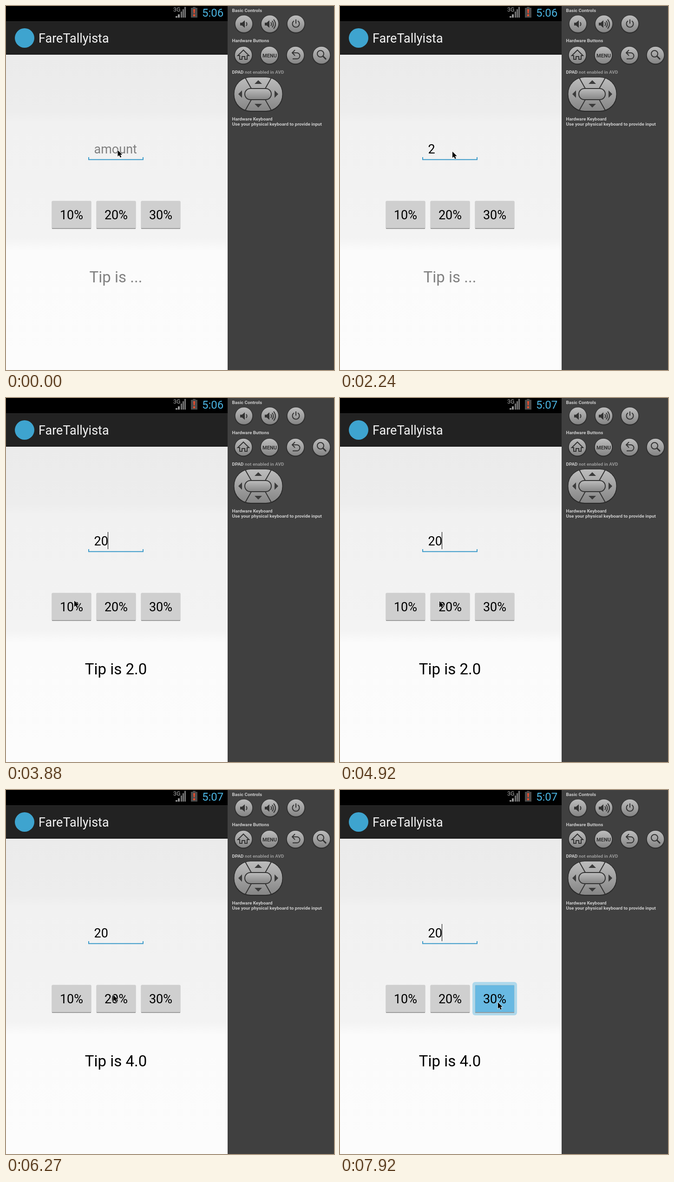
These frames come from a looping animation (706 by 785 pixels, 8 s). An HTML page:

```html
<!DOCTYPE html>
<html lang="en">
<head>
<meta charset="utf-8">
<title>Tip app</title>
<style>
html, body { margin: 0; width: 100%; height: 100%; overflow: hidden; background: #404040; }
svg { display: block; width: 706px; height: 785px; font-family: Roboto, sans-serif; }
.app { font-size: 27px; }
.mid { text-anchor: middle; }
.side { font-size: 9.9px; font-weight: 700; fill: #ccc; }
.ink { fill: none; stroke: #333; stroke-width: 2; }
</style>
</head>
<body>
<svg viewBox="0 0 706 785">
  <defs>
    <linearGradient id="page" gradientUnits="userSpaceOnUse" x1="0" y1="105" x2="0" y2="785">
      <stop offset="0" stop-color="#ebebeb"/>
      <stop offset=".18" stop-color="#ededed"/>
      <stop offset=".215" stop-color="#f1f1f1"/>
      <stop offset=".58" stop-color="#f3f3f3"/>
      <stop offset=".622" stop-color="#fbfbfb"/>
      <stop offset="1" stop-color="#fcfcfc"/>
    </linearGradient>
    <linearGradient id="metal" x1="0" y1="0" x2="0" y2="1">
      <stop offset="0" stop-color="#bdbdbd"/>
      <stop offset="1" stop-color="#858585"/>
    </linearGradient>
  </defs>

  <rect width="706" height="785" fill="#404040"/>
  <rect width="477" height="105"/>
  <rect y="33" width="477" height="72" fill="#222"/>
  <rect y="33" width="477" height="1" fill="#2d2d2d"/>
  <rect y="103" width="477" height="2" fill="#1a1a1a"/>
  <rect y="105" width="477" height="680" fill="url(#page)"/>

  <!-- status bar -->
  <text x="360" y="12" font-size="12.5" fill="#aaa">3G</text>
  <path d="M365 25v-3h4v3zM370 25v-7h4v7z" fill="#999"/>
  <path d="M376 25v-13h3v13zM380 25v-18h3v18zM384 25v-23h3v23z" fill="#777"/>
  <path d="M398 4h4v-2h6v2h4v21h-14z" fill="#4b4b4b"/>
  <path d="M403 7h4l-1 9h-2zM403 18h4v4h-4z" fill="#ee4b2b"/>
  <text id="clock" x="422" y="23" font-size="24" fill="#4bb5e2"></text>

  <circle cx="40" cy="69" r="21" fill="#3ea4cf"/>
  <text class="app" x="70" y="79" fill="#f3f3f3">FareTallyista</text>

  <!-- form -->
  <text id="amount" class="app" x="189.5" y="318"></text>
  <rect id="caret" y="289" width="1" height="37"/>
  <path d="M178 326v5.2h117v-5.2" fill="none" stroke="#3f9cca" stroke-width="2"/>
  <g id="buttons"></g>
  <text id="tip" class="mid" x="236.5" y="596" font-size="33"></text>

  <!-- side panel -->
  <g class="side">
    <text x="486.5" y="12.5">Basic Controls</text>
    <text x="486.5" y="77.5">Hardware Buttons</text>
    <text x="486.5" y="145.5">DPAD <tspan fill="#999">not enabled in AVD</tspan></text>
    <text x="486.5" y="247">Hardware Keyboard</text>
    <text x="486.5" y="258">Use your physical keyboard to provide input</text>
  </g>
  <g id="knobs"></g>

  <!-- direction pad -->
  <rect x="490" y="153" width="106" height="75" rx="36" fill="#292929"/>
  <rect x="491.5" y="154" width="103" height="72" rx="35" fill="url(#metal)"/>
  <path class="ink" d="M515 155l13 23M571 155l-13 23M515 225l13-23M571 225l-13-23"/>
  <rect x="514" y="178" width="57" height="24" rx="12" fill="url(#metal)" stroke="#333" stroke-width="2"/>
  <path d="M535 168l8-8 8 8zM535 211l8 8 8-8zM508 182l-8 8 8 8zM578 182l8 8-8 8z" fill="#3b3b3b"/>

  <path id="mouse" d="M0 0v13.5l3-2.8 2.6 5 2.2-1.1-2.4-4.8h4.3z" stroke="#fff" stroke-width="1.2" paint-order="stroke"/>
</svg>
<script>
const $ = id => document.getElementById(id);
const LOOP = 8000;

const knobs = [
  [512, 38.5, '<path d="M504 36h4l6-5v16l-6-5h-4z" fill="#333"/><path class="ink" d="M517 35q3 4 0 8"/>'],
  [568, 38.5, '<path d="M557 36h4l6-5v16l-6-5h-4z" fill="#333"/><path class="ink" d="M570 35q3 4 0 8M573 32q5 7 0 14M576 29q8 10 0 20"/>'],
  [624, 38.5, '<path class="ink" d="M620 32a7.5 7.5 0 1 0 8 0M624 29v9"/>'],
  [511, 106, '<path class="ink" d="M499 107l12-12 12 12h-4v8h-5v-6h-6v6h-5v-8z"/>'],
  [567, 106, '<text class="mid" x="567.5" y="110.5" font-size="11" font-weight="700" fill="#333">MENU</text>'],
  [623, 106, '<path class="ink" d="M622 95l-6 6 6 6M616 101h10a6 6 0 0 1 0 13h-9"/>'],
  [679, 106, '<circle class="ink" cx="677" cy="103" r="7"/><path class="ink" d="M682 108l7 7" style="stroke-width:3"/>']
];
$('knobs').innerHTML = knobs.map(([x, y, icon]) =>
  `<circle cx="${x}" cy="${y + .8}" r="20" fill="#303030"/>
   <circle cx="${x}" cy="${y}" r="18.3" fill="url(#metal)"/>${icon}`).join('');

$('buttons').innerHTML = [10, 20, 30].map((n, i) => {
  const x = 99 + 96 * i;
  return `<rect id="halo${n}" x="${x - 6}" y="414" width="96" height="72" rx="6" fill="#afd9ec"/>
    <rect x="${x - .5}" y="420.5" width="85" height="60" rx="2" fill="#bbb"/>
    <rect x="${x}" y="479" width="84" height="1.5" fill="#8e8e8e"/>
    <rect id="face${n}" x="${x}" y="421" width="84" height="58" rx="1"/>
    <text class="app mid" x="${x + 42}" y="460">${n}%</text>`;
}).join('');

// Each step changes part of the state and holds until the next.
const steps = [
  [0, { typed: '', caret: 0, mouse: [240.5, 311], pressed: 0, tip: '...', clock: '5:06' }],
  [440, { caret: 1 }],
  [1040, { caret: 0 }],
  [1190, { mouse: [242, 314] }],
  [1490, { caret: 1 }],
  [1640, { typed: '2' }],
  [2240, { caret: 0 }],
  [2540, { typed: '20', caret: 1 }],
  [2840, { mouse: [238, 340] }],
  [2990, { mouse: [200, 368] }],
  [3140, { mouse: [161, 398], caret: 0 }],
  [3280, { mouse: [147, 437] }],
  [3580, { caret: 1 }],
  [3730, { pressed: 10 }],
  [3880, { pressed: 0, tip: '2.0' }],
  [4020, { caret: 0 }],
  [4320, { clock: '5:07' }],
  [4620, { caret: 1 }],
  [4770, { mouse: [178, 437] }],
  [4920, { mouse: [214, 438] }],
  [5070, { mouse: [225, 440], caret: 0 }],
  [5220, { mouse: [229, 441] }],
  [5370, { mouse: [231, 442] }],
  [5520, { caret: 1 }],
  [5970, { caret: 0 }],
  [6120, { pressed: 20 }],
  [6270, { pressed: 0, tip: '4.0' }],
  [6570, { caret: 1 }],
  [7020, { caret: 0 }],
  [7170, { mouse: [256, 444] }],
  [7320, { mouse: [306, 450] }],
  [7470, { mouse: [340, 458] }],
  [7620, { caret: 1 }],
  [7920, { pressed: 30 }]
];

function draw(now) {
  const time = now % LOOP;
  const s = Object.assign({}, ...steps.filter(([at]) => at <= time).map(([, change]) => change));
  const idle = s.tip === '...';
  $('amount').textContent = s.typed || 'amount';
  $('amount').setAttribute('fill', s.typed ? '#000' : '#808080');
  $('caret').setAttribute('x', [190.5, 204, 219][s.typed.length]);
  $('caret').style.opacity = s.caret;
  $('tip').textContent = 'Tip is ' + s.tip;
  $('tip').setAttribute('fill', idle ? '#808080' : '#000');
  $('clock').textContent = s.clock;
  $('mouse').setAttribute('transform', `translate(${s.mouse})`);
  for (const n of [10, 20, 30]) {
    const down = s.pressed === n;
    $('halo' + n).style.opacity = +down;
    $('face' + n).setAttribute('fill', down ? '#68b9e2' : '#cfcfcf');
  }
}

const start = performance.now();
function tick() {
  draw(performance.now() - start);
  requestAnimationFrame(tick);
}
tick();
</script>
</body>
</html>
```
